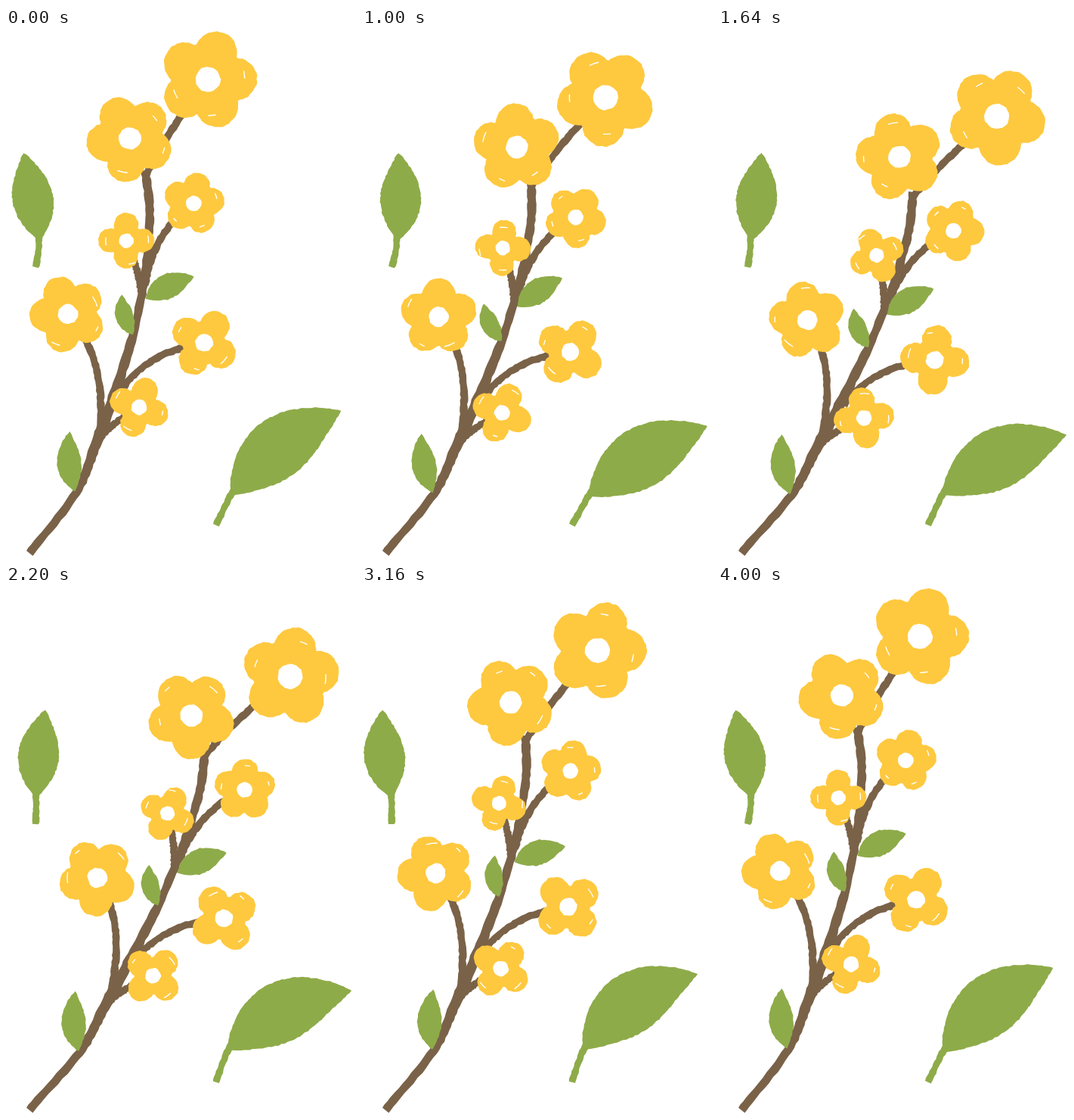
An HTML page with a canvas for the animation above (4040 ms loop, 463 by 699 pixels).

```html
<!DOCTYPE html>
<html lang="en">
<head>
<meta charset="utf-8">
<title>Swaying branch</title>
<style>
html, body { margin: 0; width: 100%; height: 100%; overflow: hidden; background: #fff; }
canvas { display: block; }
</style>
</head>
<body>
<canvas id="stage" width="463" height="699"></canvas>
<script>
const ctx = document.getElementById('stage').getContext('2d');
const YELLOW = '#fec93f', GREEN = '#8eab49', BROWN = '#7a6248';
const LOOP = 4040, CYCLE = 4000, STEP = 40;
const ROOT = { x: 31, y: 694 }, HEIGHT = 626;
const TAU = 2 * Math.PI, rad = Math.PI / 180;

// Resting centre, size, petal count, first petal angle, share of the sway,
// and the twig: where it leaves the stem and its control point
const flowers = [
  { x: 267, y: 68, size: 65, petals: 5, turn: -73, give: 1, twig: [[184, 197], [217, 131]] },
  { x: 164, y: 146, size: 58, petals: 5, turn: -117, give: 0.9 },
  { x: 248, y: 232, size: 41, petals: 5, turn: -80, give: 1, twig: [[184, 340], [194, 270]] },
  { x: 159, y: 281, size: 37, petals: 4, turn: -90, give: 0.94, twig: [[179, 350], [176, 320]] },
  { x: 82, y: 378, size: 51, petals: 5, turn: -111, give: 1, twig: [[123, 540], [136, 440]] },
  { x: 262, y: 416, size: 46, petals: 4, turn: -58, give: 0.86, twig: [[148, 487], [178, 430]] },
  { x: 176, y: 501, size: 40, petals: 4, turn: -70, give: 1.05, twig: [[118, 550], [136, 524]] }
];

const stem = [[31, 694], [92, 615], [118, 552], [143, 485], [168, 405], [184, 325], [190, 245], [184, 188]];

const sprouts = [
  { x: 91, y: 612, len: 79, half: 16, bow: 4, lean: -5, swing: 6 },
  { x: 168, y: 405, len: 55, half: 12, bow: 4, lean: -16, swing: 10 },
  { x: 185, y: 358, len: 70, half: 16.5, bow: 3, lean: 65, swing: 8 }
];

let phase, sway;

const wave = (mean, a, b) => mean + a * Math.cos(phase) + b * Math.sin(phase);
const mix = (a, b, u) => a + (b - a) * u;

// Repeatable noise from 0 to 1
function noise(i) {
  const v = Math.sin(i * 12.9898 + 4.1) * 43758.5453;
  return v - Math.floor(v);
}
const rough = i => (noise(i) - 0.5) * 1.5;

// The branch leans about its root, more towards the top
const tilt = y => sway * 0.185 * Math.pow(Math.max(0, ROOT.y - y) / HEIGHT, 0.55);

function bend(x, y, give = 1) {
  const a = tilt(y) * give, dx = x - ROOT.x, dy = y - ROOT.y;
  return [ROOT.x + dx * Math.cos(a) - dy * Math.sin(a),
          ROOT.y + dx * Math.sin(a) + dy * Math.cos(a)];
}

function fillPoly(points) {
  ctx.beginPath();
  points.forEach(p => ctx.lineTo(p[0], p[1]));
  ctx.closePath();
  ctx.fill();
}

// Samples at(u) -> [x, y, half width] and fills both sides of that spine
function fillSpine(at, n, seed) {
  const spine = Array.from({ length: n + 1 }, (_, i) => at(i / n));
  const left = [], right = [];
  spine.forEach(([x, y, half], i) => {
    const a = spine[Math.max(0, i - 1)], b = spine[Math.min(n, i + 1)];
    const dir = Math.atan2(b[1] - a[1], b[0] - a[0]);
    const nx = Math.sin(dir), ny = -Math.cos(dir);
    const l = half + rough(seed + i), r = half + rough(seed + i + 500);
    left.push([x + nx * l, y + ny * l]);
    right.unshift([x - nx * r, y - ny * r]);
  });
  fillPoly(left.concat(right));
}

const spline = (a, b, c, d, u) => b + 0.5 * u * (c - a
  + u * (2 * a - 5 * b + 4 * c - d + u * (3 * (b - c) + d - a)));

const quad = (a, b, c, u) => mix(mix(a, b, u), mix(b, c, u), u);

function drawStem() {
  const last = stem.length - 1;
  fillSpine(u => {
    const k = Math.min(last - 1, Math.floor(u * last));
    const q = [-1, 0, 1, 2].map(j => stem[Math.max(0, Math.min(last, k + j))]);
    const [x, y] = [0, 1].map(j => spline(q[0][j], q[1][j], q[2][j], q[3][j], u * last - k));
    const fork = Math.exp(-Math.pow((u - 0.35) * 7, 2));
    return [...bend(x, y), 5.6 + 1.8 * fork];
  }, 90, 200);
}

function drawTwig(f, id) {
  if (!f.twig) return;
  const [from, ctrl] = f.twig;
  fillSpine(u => [
    ...bend(quad(from[0], ctrl[0], f.x, u), quad(from[1], ctrl[1], f.y, u), mix(1, f.give, u)),
    4.8
  ], 40, 300 + id * 60);
}

function leaf([x0, y0], [x1, y1], half, bow, seed) {
  const len = Math.hypot(x1 - x0, y1 - y0);
  const nx = (y1 - y0) / len, ny = (x0 - x1) / len;
  fillSpine(u => {
    const off = 4 * u * (1 - u) * bow;
    const h = half * Math.pow(Math.max(0, Math.sin(Math.PI * Math.pow(u, 0.92))), 0.9);
    return [mix(x0, x1, u) + nx * off, mix(y0, y1, u) + ny * off, h];
  }, Math.round(len / 3), seed);
}

function stalk(from, ctrl, to, seed) {
  fillSpine(u => [quad(from[0], ctrl[0], to[0], u), quad(from[1], ctrl[1], to[1], u), 4.4], 16, seed);
}

function blob(angle, dist, r, seed) {
  const n = Math.max(18, Math.round(r * 1.6));
  const x = dist * Math.cos(angle), y = dist * Math.sin(angle);
  fillPoly(Array.from({ length: n }, (_, i) => {
    const a = i / n * TAU, d = r + rough(seed + i);
    return [x + d * Math.cos(a), y + d * Math.sin(a)];
  }));
}

function drawFlower(f, id) {
  const { size, petals } = f, seed = id * 300;
  const angle = k => f.turn * rad + k / petals * TAU;
  ctx.save();
  ctx.translate(...bend(f.x, f.y, f.give));
  ctx.rotate(phase + tilt(f.y));
  ctx.fillStyle = YELLOW;
  blob(0, 0, size * (0.1 + 0.13 * petals), seed);
  for (let k = 0; k < petals; k++) blob(angle(k), size * 0.57, size * 0.43, seed + 50 * k);
  ctx.fillStyle = ctx.strokeStyle = '#fff';
  blob(0, 0, size * 0.255, seed + 7);
  ctx.lineWidth = 1.4;
  ctx.lineCap = 'round';
  // Small gaps in the crayon near the rim
  for (let k = 1; k < 4; k++) {
    const a = angle(k) + rough(seed + k) * 0.5, arc = 0.06 + 0.12 * noise(seed + k + 9);
    ctx.beginPath();
    ctx.arc(0, 0, size * mix(0.7, 0.85, noise(seed + k + 20)), a - arc, a + arc);
    ctx.stroke();
  }
  ctx.restore();
}

function drawLooseLeaves() {
  const jx = wave(43, 1.5, 4);
  leaf([jx, 281], [wave(39.5, -16, 8.5), 165], 27, wave(0.3, -1.3, -4), 40);
  stalk([jx - 1, 268], [jx, 294], [39, 316], 80);

  const kx = wave(296.5, 1.5, 4), ky = wave(615, 1, 2.5);
  leaf([kx, ky + 1], [wave(451, -8, 5.5), wave(522, -16, 4)], 40, wave(12.5, -1, -4), 120);
  stalk([kx + 5, ky - 9], [kx - 8, 630], [278, 657], 160);
}

function drawSprout(s, id) {
  const [x, y] = bend(s.x, s.y), a = (s.lean - s.swing * Math.sin(phase)) * rad;
  leaf([x, y], [x + s.len * Math.sin(a), y - s.len * Math.cos(a)], s.half, s.bow, 900 + id * 60);
}

function draw(t) {
  phase = t / CYCLE * TAU;
  sway = (1 - Math.cos(phase - 0.03)) / 2;
  ctx.fillStyle = '#fff';
  ctx.fillRect(0, 0, 463, 699);
  ctx.fillStyle = GREEN;
  drawLooseLeaves();
  ctx.fillStyle = BROWN;
  drawStem();
  flowers.forEach(drawTwig);
  ctx.fillStyle = GREEN;
  sprouts.forEach(drawSprout);
  flowers.forEach(drawFlower);
}

const start = performance.now();
function tick() {
  const t = (performance.now() - start) % LOOP;
  draw(Math.floor(t / STEP) * STEP);
  requestAnimationFrame(tick);
}
tick();
</script>
</body>
</html>
```
